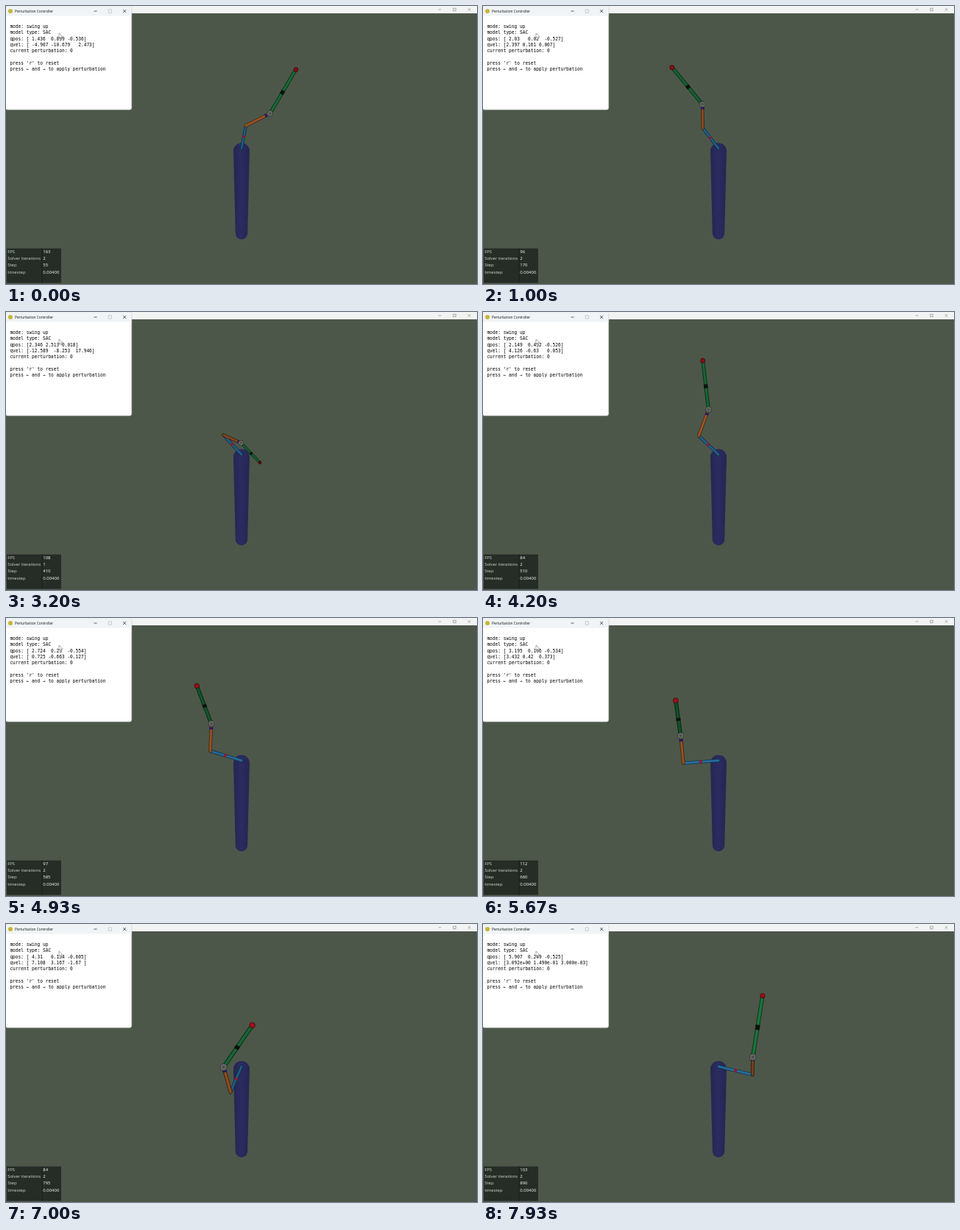
Write an HTML page with a canvas that moves like this. It is 640x379 px and loops after 8 s.

```html
<!DOCTYPE html>
<html lang="en">
<head>
<meta charset="utf-8">
<title>Perturbation Controller</title>
<style>
  html, body { margin: 0; height: 100%; overflow: hidden; background: #4c574a; }
  canvas { display: block; width: 100vw; height: 100vh; }
</style>
</head>
<body>
<canvas id="stage" width="640" height="379"></canvas>
<script>
const ctx = document.getElementById('stage').getContext('2d');
const LOOP = 8000, DT = 0.004;
const ARM = 47.6, LOWER = 43, UPPER = 77;
const MONO = '"DejaVu Sans Mono", monospace', SANS = '"Open Sans", sans-serif';

// Joint angles (rad) and, where known, velocities (rad/s) at a simulation step
const poses = [
  { step: 55, pos: [1.436, 0.899, -0.536], vel: [-4.907, -10.679, 2.473] },
  { step: 80, pos: [1.27, 0.1, -0.53] },
  { step: 310, pos: [3.021, 0.146, -0.525], vel: [0.489, -0.036, 0] },
  { step: 380, pos: [3.3, 2.8, -0.45] },
  { step: 410, pos: [2.346, 2.513, 0.018], vel: [-12.589, -8.253, 17.946] },
  { step: 440, pos: [1.35, 1.4, 0.1] },
  { step: 510, pos: [2.149, 0.452, -0.526], vel: [4.126, -0.63, 0.053] },
  { step: 660, pos: [3.195, 0.166, -0.534], vel: [3.432, 0.42, 0.373] },
  { step: 795, pos: [4.31, 0.134, -0.605], vel: [7.108, 3.167, -1.67] },
  { step: 890, pos: [5.907, 0.249, -0.525], vel: [3.092, 0.149, 0.003] }
];
poses.forEach((p, i) => {
  const a = poses[i - 1], b = poses[i + 1];
  p.vel ??= p.pos.map((_, j) => (b.pos[j] - a.pos[j]) / ((b.step - a.step) * DT));
});

// Cubic Hermite interpolation, drifting on linearly after the last pose
function stateAt(step) {
  const next = poses.findIndex(p => p.step > step);
  if (next < 0) {
    const { step: end, pos, vel } = poses.at(-1);
    return { pos: pos.map((q, j) => q + vel[j] * (step - end) * DT), vel };
  }
  const a = poses[next - 1], b = poses[next];
  const h = (b.step - a.step) * DT, u = (step - a.step) / (b.step - a.step);
  const pos = [], vel = [];
  a.pos.forEach((q, j) => {
    const d = b.pos[j] - q, m = a.vel[j] * h, n = b.vel[j] * h;
    const c2 = 3 * d - 2 * m - n, c3 = m + n - 2 * d;
    pos.push(q + u * (m + u * (c2 + u * c3)));
    vel.push((m + u * (2 * c2 + 3 * u * c3)) / h);
  });
  return { pos, vel };
}

// Prints an array the way numpy does after rounding to three digits
function formatArray(values) {
  const v = values.map(x => Math.round(x * 1000) / 1000 || 0);
  const sizes = v.filter(x => x).map(Math.abs);
  if (Math.max(...sizes) / Math.min(...sizes) > 1000) {
    const exp = v.map(x => x.toExponential(3).replace(/(\d)$/, '0$1'));
    const width = Math.max(...exp.map(s => s.length));
    return '[' + exp.map(s => s.padStart(width)).join(' ') + ']';
  }
  const parts = v.map(x => x.toFixed(3).replace(/0+$/, '').split('.'));
  const left = Math.max(...parts.map(p => p[0].length));
  const right = Math.max(...parts.map(p => p[1].length));
  return '[' + parts.map(p => p[0].padStart(left) + '.' + p[1].padEnd(right)).join(' ') + ']';
}

// Drawn large and scaled down, so small glyphs keep fractional advances
function text(str, x, y, size, family, color) {
  ctx.save();
  ctx.translate(x, y);
  ctx.scale(0.1, 0.1);
  ctx.font = `${size * 10}px ${family}`;
  ctx.fillStyle = color;
  ctx.fillText(str, 0, 0);
  ctx.restore();
}

function line(a, b, color, width = 0.7) {
  ctx.beginPath();
  ctx.moveTo(...a);
  ctx.lineTo(...b);
  ctx.strokeStyle = color;
  ctx.lineWidth = width;
  ctx.stroke();
}

function disc(x, y, r, color) {
  ctx.beginPath();
  ctx.arc(x, y, r, 0, 7);
  ctx.fillStyle = color;
  ctx.fill();
}

const rgb = (color, k) => `rgb(${color.map(c => Math.round(c * k))})`;
const mix = (a, b, u) => a.map((v, i) => v + (b[i] - v) * u);

// Camera pitched 45 degrees down, aimed at the top of the pillar
function project([x, y, z]) {
  const s = 445 / (445 + (y - z) * Math.SQRT1_2);
  return { x: 320 + x * s, y: 194.3 - (y + z) * Math.SQRT1_2 * s, s };
}

// A shaded rod, darker the more it points at the camera, with a joint band
function rod(a, b, width, color, bandAt, bandColor) {
  const axis = a.map((v, i) => b[i] - v);
  const facing = (axis[2] - axis[1]) * Math.SQRT1_2 / Math.hypot(...axis);
  const light = 0.35 + 0.65 * Math.sqrt(Math.max(0, 1 - facing * facing));
  const at = u => { const p = project(mix(a, b, u)); return [p.x, p.y]; };
  const w = width * project(mix(a, b, 0.5)).s;
  ctx.lineCap = 'round';
  line(at(0), at(1), rgb(color, light * 0.5), w);
  line(at(0), at(1), rgb(color, light), w * 0.6);
  ctx.lineCap = 'butt';
  line(at(bandAt - 0.04), at(bandAt + 0.04), bandColor, w * 1.1);
}

function drawPillar() {
  const g = ctx.createLinearGradient(309, 0, 331, 0);
  g.addColorStop(0, '#26264f');
  g.addColorStop(0.45, '#2b2b61');
  g.addColorStop(1, '#262652');
  ctx.beginPath();
  ctx.arc(320, 197.7, 11, Math.PI, 0);
  ctx.arc(320, 310, 8.2, 0, Math.PI);
  ctx.fillStyle = g;
  ctx.fill();
}

function drawPendulum([turn, lean, bend]) {
  const link = (from, length, angle) => [
    from[0] + length * Math.sin(angle) * Math.sin(turn),
    from[1] - length * Math.sin(angle) * Math.cos(turn),
    from[2] + length * Math.cos(angle)
  ];
  const elbow = [ARM * Math.cos(turn), ARM * Math.sin(turn), 0];
  const knee = link(elbow, LOWER, lean);
  const tip = link(knee, UPPER, lean + bend);

  rod([0, 0, 0], elbow, 4.3, [38, 112, 160], 0.51, '#8c1a30');
  rod(elbow, knee, 4.6, [168, 92, 40], 0.84, '#281a62');
  rod(knee, tip, 4.7, [30, 128, 66], 0.51, '#0c120e');

  const k = project(knee), t = project(tip);
  disc(k.x, k.y, 4.3 * k.s, '#303430');
  disc(k.x, k.y, 3.5 * k.s, '#686c68');
  disc(k.x, k.y, 1.8 * k.s, '#4a4e4a');
  disc(t.x, t.y, 2.9 * t.s, rgb([54, 8, 10], t.s));
  disc(t.x, t.y, 2.2 * t.s, rgb([126, 12, 16], t.s));
}

function windowButtons(x, y, gap, r, dark, pale) {
  line([x - r, y], [x + r, y], dark);
  ctx.strokeStyle = pale;
  ctx.strokeRect(x + gap - r, y - r, 2 * r, 2 * r);
  const cx = x + 2 * gap;
  line([cx - r, y - r], [cx + r, y + r], dark);
  line([cx - r, y + r], [cx + r, y - r], dark);
}

function drawCursor(x, y) {
  ctx.lineWidth = 0.5;
  ctx.strokeStyle = '#555';
  ctx.fillStyle = '#fff';
  const shape = new Path2D(`M${x} ${y}v7l1.6-1.4 1.1 2.4 1.1-.5-1-2.3h2.2z`);
  ctx.fill(shape);
  ctx.stroke(shape);
}

function drawDialog({ pos, vel }) {
  ctx.beginPath();
  ctx.roundRect(-0.5, 0, 171.3, 141.6, 3);
  ctx.fillStyle = '#fff';
  ctx.fill();
  ctx.strokeStyle = '#a4a9a3';
  ctx.lineWidth = 0.5;
  ctx.stroke();
  ctx.fillStyle = '#f0f4f6';
  ctx.fillRect(0, 0.4, 170.4, 13.1);
  disc(6, 7, 3, '#c9b534');
  text('Perturbation Controller', 12, 8.8, 4.8, SANS, '#111');
  windowButtons(121.5, 7, 19.8, 2.1, '#222', '#bbb');

  [
    'mode: swing up',
    'model type: SAC',
    'qpos: ' + formatArray(pos),
    'qvel: ' + formatArray(vel),
    'current perturbation: 0',
    '',
    "press 'r' to reset",
    'press ← and → to apply perturbation'
  ].forEach((row, i) => text(row, 5.4, 30.1 + i * 8.28, 6.17, MONO, '#000'));
  drawCursor(72, 37);
}

function drawStats(step, frame) {
  ctx.fillStyle = '#262c26';
  ctx.fillRect(1, 330.5, 74, 47);
  ctx.fillStyle = '#181c18';
  ctx.fillRect(48.6, 330.5, 0.9, 47);
  const fps = Math.round(98 + 14 * Math.cos((frame - 85) * 0.15) + 51 * Math.exp(-frame / 6));
  const solver = step >= 390 && step < 435 ? 1 : 2;
  Object.entries({ FPS: fps, 'Solver iterations': solver, Step: step, timestep: '0.00400' })
    .forEach(([label, value], i) => {
      const y = 336.6 + i * 9.3;
      text(label, 2.2, y, 5.95, SANS, '#d8dad8');
      text(String(value), 50.2, y, 6, SANS, '#fff');
    });
}

function render(ms) {
  const frame = Math.floor((ms + 4) * 0.015);
  const raw = frame <= 33 ? 55 + frame * 255 / 33 : 310 + (frame - 33) * 580 / 86;
  const step = Math.floor(raw / 5 + 1e-6) * 5;

  ctx.fillStyle = '#4c574a';
  ctx.fillRect(0, 0, 640, 379);
  ctx.fillStyle = '#f1f4f2';
  ctx.fillRect(0, 0, 640, 10);
  windowButtons(589.5, 4.8, 20, 1.7, '#888', '#888');
  drawPillar();
  // The picture runs slightly ahead of the read-out
  drawPendulum(stateAt(step + Math.min(4, frame)).pos);
  drawDialog(stateAt(step));
  drawStats(step, frame);
}

const start = performance.now();
function tick() {
  render((performance.now() - start) % LOOP);
  requestAnimationFrame(tick);
}
tick();
</script>
</body>
</html>
```
